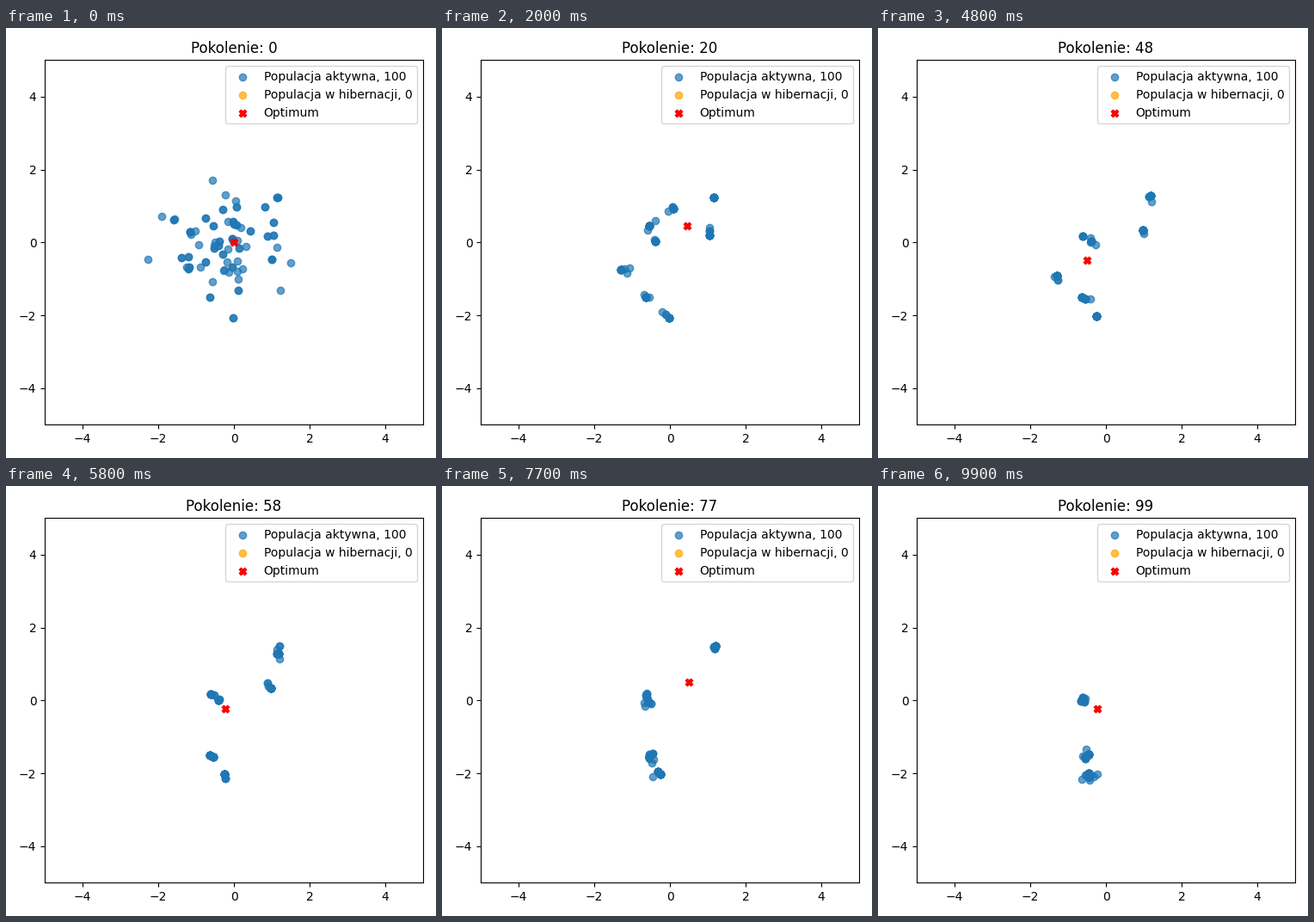
These frames come from a looping animation (500 px wide and 500 px high, 10 s). A matplotlib script:

```python
from collections import namedtuple

import matplotlib.pyplot as plt
import numpy as np
from matplotlib.animation import FuncAnimation

SIZE = 100
GENERATIONS = 100
MUTATION_RATE = .05
MUTATION_STEP = .09
DRIFT_END = 17

Niche = namedtuple("Niche", "start end death")

NICHES = [
    Niche((1.16, 1.24), (1.22, 1.5), 94),
    Niche((1.05, .2), (.95, .45), 60),
    Niche((.07, .97), (.04, 1.02), 42),
    Niche((-.55, .45), (-.55, .45), 42),
    Niche((-.39, .03), (-.68, 0), GENERATIONS),
    Niche((-1.2, -.73), (-1.24, -1.02), 54),
    Niche((-.64, -1.5), (-.5, -1.52), GENERATIONS),
    Niche((-.02, -2.07), (-.5, -2.08), GENERATIONS),
]


def centre(niche, g):
    """Place that the niche favours in generation g."""
    start, end = np.array(niche.start), np.array(niche.end)
    return start + (end - start) * g / niche.death


def breed(rng, parents, count, goal, width):
    """Draw fit parents with replacement and mutate a few children."""
    fitness = np.exp(-((parents - goal) ** 2).sum(axis=1) / (2 * width ** 2))
    picks = rng.choice(len(parents), count, p=fitness / fitness.sum())
    children = parents[picks]
    mutated = rng.random(count) < MUTATION_RATE
    children[mutated] += rng.normal(0, MUTATION_STEP, (mutated.sum(), 2))
    return children


def first_drifters(rng, count):
    """Scattered cloud in which some places hold several individuals."""
    cloud = rng.normal(0, (.9, .85), (4 * count, 2))
    inside = np.hypot(cloud[:, 0] / 2.4, cloud[:, 1] / 1.9) < 1
    return cloud[inside][rng.choice(count, count)]


def evolve(seed):
    rng = np.random.default_rng(seed)
    members = {n: np.tile(n.start, (2, 1)) for n in NICHES}
    drifting = SIZE - 2 * len(NICHES)
    drifters = first_drifters(rng, drifting)
    history = [np.concatenate([drifters, *members.values()])]

    for g in range(1, GENERATIONS):
        count = max(0, round(drifting * (1 - g / DRIFT_END)))
        if count:
            drifters = breed(rng, drifters, count, (0, 0), 1.8)
        else:
            drifters = np.empty((0, 2))
        alive = [n for n in NICHES if g < n.death]
        shares = np.array_split(np.arange(SIZE - count), len(alive))
        members = {n: breed(rng, members[n], len(share), centre(n, g), .14)
                   for n, share in zip(alive, shares)}
        history.append(np.concatenate([drifters, *members.values()]))
    return history


history = evolve(seed=7)

fig, ax = plt.subplots(figsize=(5, 5), dpi=100)
active = ax.scatter(*history[0].T, alpha=.7,
                    label=f"Populacja aktywna, {SIZE}")
ax.scatter([], [], color="orange", alpha=.7,
           label="Populacja w hibernacji, 0")
optimum = ax.scatter([0], [0], color="red", marker="X", label="Optimum")
ax.set(xlim=(-5, 5), ylim=(-5, 5))
title = ax.set_title("Pokolenie: 0")
ax.legend(loc="upper right")
fig.tight_layout()


def update(g):
    active.set_offsets(history[g])
    best = .5 * np.sin(.1 * g)
    optimum.set_offsets([(best, best)])
    title.set_text(f"Pokolenie: {g}")
    return active, optimum, title


anim = FuncAnimation(fig, update, frames=GENERATIONS, interval=100,
                     repeat=True, repeat_delay=0)
plt.show()
```
